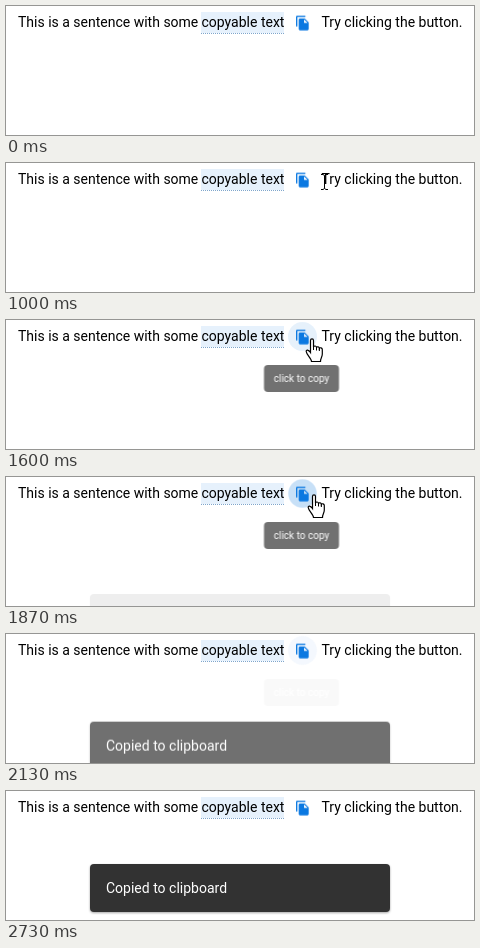
Animation of 468 by 129 pixels, one loop 3.94 s. Source, as an HTML page:

```html
<!DOCTYPE html>
<html lang="en">
<head>
<meta charset="utf-8">
<title>Copy to clipboard</title>
<style>
  html, body { margin: 0; width: 100%; height: 100%; overflow: hidden; background: #fff; }
  svg { display: block; font: 14px Roboto, sans-serif; }
  .accent { fill: #0a78e1; }
  .light { fill: #fff; }
  #snackbar rect { fill: #323232; filter: drop-shadow(0 1px 1px rgba(0, 0, 0, .35)); }
  #tooltip rect { fill: #717171; }
  #tooltip text { font-size: 10px; text-anchor: middle; }
  #cursors > g { opacity: 0; }
</style>
</head>
<body>
<svg width="468" height="129" viewBox="0 0 468 129">
  <rect x="195" y="6" width="83" height="21" fill="#e6f1fc"/>
  <path d="M195 27.5H278" stroke="#7fa6cc" stroke-dasharray="1 1"/>
  <text x="12" y="21">This is a sentence with some</text>
  <text x="195.5" y="21">copyable text</text>
  <text x="315.5" y="21">Try clicking the button.</text>

  <circle id="hover" class="accent" cx="296.5" cy="16.5" r="14.5"/>
  <circle id="ripple" class="accent" r="14.5"/>
  <path class="accent" transform="translate(288.7 9) scale(.6667)"
    d="M16 1H4c-1.1 0-2 .9-2 2v14h2V3h12V1zm-1 4l6 6v10c0 1.1-.9 2-2 2H7.99C6.89 23 6 22.1 6 21l.01-14c0-1.1.89-2 1.99-2h7zm-1 7h5.5L14 6.5V12z"/>

  <g id="tooltip">
    <rect x="-37.5" width="75" height="27" rx="4"/>
    <text class="light" y="17">click to copy</text>
  </g>

  <g id="snackbar">
    <rect x="84" y="73" width="300" height="48" rx="4"/>
    <text class="light" x="100" y="102">Copied to clipboard</text>
  </g>

  <g id="cursors">
    <g id="arrow">
      <path d="M.5 .5V16.5L4.2 13L6.7 18.6L9 17.6L6.6 12.2H11.7Z" fill="#fff" stroke="#000"/>
    </g>
    <g id="beam">
      <path d="M-3 -7.5H-1L.5 -6.5L2 -7.5H4M.5 -6.5V6.5M-3 7.5H-1L.5 6.5L2 7.5H4" fill="none" stroke="#000"/>
    </g>
    <g id="hand">
      <path d="M-1.5 1.5C-1.5 -.7 1.5 -.7 1.5 1.5V8C2 6.5 4.5 6.7 4.5 8.5C5 7.3 7.4 7.6 7.4 9.3C8 8.3 10.3 8.7 10.3 10.5V15C10.3 18 8.5 19 8.5 22.5H-.5C-.5 19.5 -5.5 15.5 -5.8 12.5C-6 10.5 -3.5 10.5 -1.5 13.5Z" fill="#fff" stroke="#000" stroke-width="1.2"/>
      <path d="M1.5 7V11M4.5 8V11.5M7.4 9V12" stroke="#000"/>
    </g>
  </g>
</svg>
<script>
const LOOP = 3940;
const STEPS = 60;
const stepTime = k => Math.round(k * 20 / 3) * 10;
const clamp = v => Math.min(1, Math.max(0, v));
const progress = (t, start, length) => clamp((t - start) / length);

// cubic-bezier(0, 0, .2, 1)
function decelerate(x) {
  let low = 0, high = 1;
  for (let i = 0; i < 24; i++) {
    const s = (low + high) / 2;
    if (.6 * (1 - s) * s * s + s ** 3 < x) low = s; else high = s;
  }
  return 3 * (1 - low) * low * low + low ** 3;
}

// First step, shape and hotspot; each pose holds until the next one.
const cursorPath = [
  [8, 'arrow', 446, 44], [9, 'arrow', 425, 41], [10, 'arrow', 399, 37],
  [11, 'arrow', 373, 33], [12, 'arrow', 351, 29], [13, 'beam', 335, 24],
  [14, 'beam', 324, 20], [15, 'beam', 318, 19], [16, 'hand', 311, 19],
  [17, 'hand', 307, 19], [18, 'hand', 306, 19], [28, 'hand', 308, 18],
  [29, 'beam', 366, 14], [30, 'beam', 422, 11], [31, 'none', 422, 11]
];

const startTime = document.timeline.currentTime || 0;

// Plays a function of time in held steps.
function track(id, pose) {
  const frames = [];
  for (let k = 0; k < STEPS && stepTime(k) < LOOP; k++) {
    const t = stepTime(k);
    frames.push({ offset: t / LOOP, easing: 'steps(1, end)', ...pose(t, k) });
  }
  frames.push({ ...frames.at(-1), offset: 1 });
  document.getElementById(id)
    .animate(frames, { duration: LOOP, iterations: Infinity })
    .startTime = startTime;
}

track('hover', t => ({
  opacity: .1 * (progress(t, 1060, 200) - progress(t, 1960, 220))
}));

track('ripple', t => ({
  opacity: t < 1660 ? 0 : .14 * (1 - progress(t, 1980, 180)),
  transform: `translate(296.5px, 16.5px) scale(${decelerate(progress(t, 1640, 300))})`
}));

track('tooltip', t => {
  const shown = decelerate(progress(t, 1110, 430));
  const hidden = decelerate(progress(t, 1924, 280));
  return {
    opacity: shown * (1 - hidden),
    transform: `translate(295.5px, 45px) scale(${shown})`
  };
});

track('snackbar', t => {
  const shown = decelerate(progress(t, 1853, 810));
  return { opacity: shown, transform: `translateY(${48 * (1 - shown)}px)` };
});

for (const shape of ['arrow', 'beam', 'hand']) {
  track(shape, (t, k) => {
    const [, kind, x, y] = cursorPath.findLast(p => p[0] <= k) || [0, 'none', 0, 0];
    return { opacity: kind === shape ? 1 : 0, transform: `translate(${x}px, ${y}px)` };
  });
}
</script>
</body>
</html>
```
